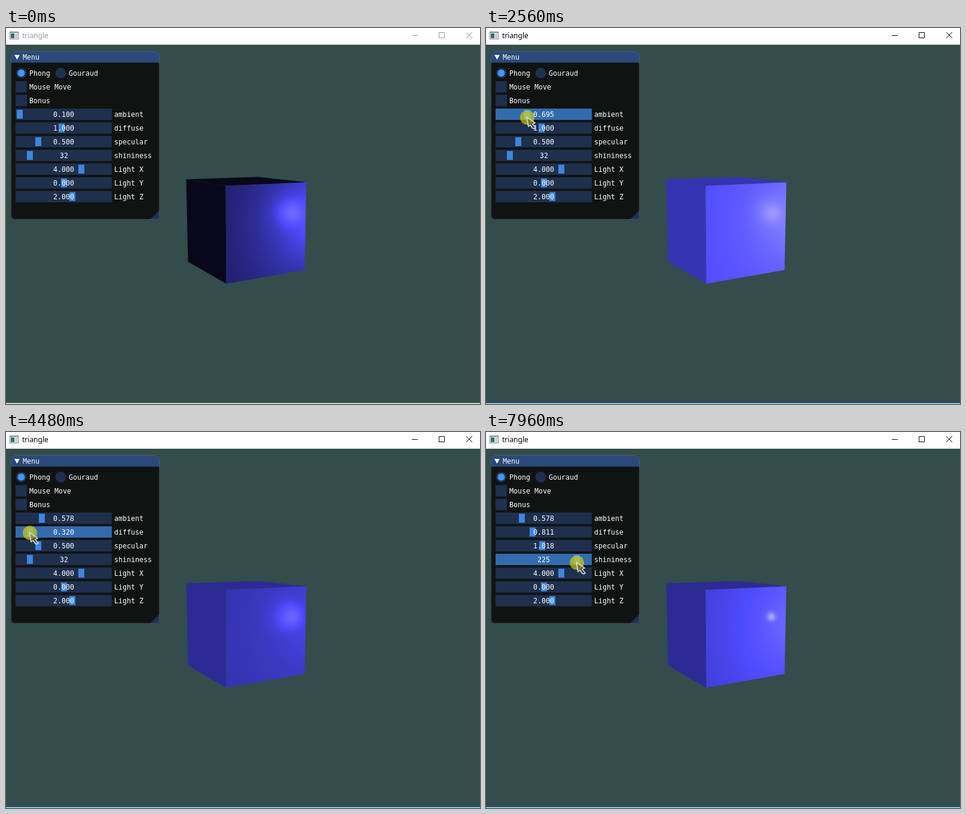
These frames come from a looping animation (793x630 px, 8000 ms). An HTML page with a canvas:

```html
<!DOCTYPE html>
<html lang="en">
<head>
<meta charset="utf-8">
<title>triangle</title>
<style>
html, body { margin: 0; width: 100%; height: 100%; overflow: hidden; background: #334c4c; }
canvas { display: block; }
</style>
</head>
<body>
<canvas id="stage" width="793" height="630"></canvas>
<script>
const ctx = document.getElementById('stage').getContext('2d');
const LOOP = 8000, STEP = 40, ENTER = 160, FOCUS = 1160;
const MONO = '11.63px "DejaVu Sans Mono", monospace';
const SANS = '12px "Noto Sans", sans-serif';
const TRACK_X = 23, TRACK_W = 147;

// drag: turning points [time, x] while the button is held until "to"; dy: grip below the row's middle
const SLIDERS = [
  { name: 'ambient', min: 0.1, max: 2, start: 0.1, to: 2840, dy: 5,
    drag: [[FOCUS, 30], [1840, 95], [2000, 99], [2400, 56], [2560, 69], [2720, 60]] },
  { name: 'diffuse', min: 0.1, max: 2, start: 1, to: 5240, dy: 1,
    drag: [[3120, 75], [3480, 96], [3880, 157], [4480, 40], [4600, 28], [5160, 78]] },
  { name: 'specular', min: 0.1, max: 2, start: 0.5, to: 6880, dy: 4,
    drag: [[5440, 54], [5960, 89], [6120, 112], [6400, 28], [6720, 94]] },
  { name: 'shininess', min: 2, max: 256, start: 32, to: LOOP, dy: 5, whole: true,
    drag: [[7360, 34], [7960, 152]] },
  { name: 'Light X', min: -10, max: 10, start: 4 },
  { name: 'Light Y', min: -10, max: 10, start: 0 },
  { name: 'Light Z', min: -10, max: 10, start: 2 }
];
const rowTop = i => 135 + i * 23;
const clamp = k => Math.max(0, Math.min(1, k));

// The pointer enters, waits, then goes from drag to drag.
const path = [[ENTER, 653, 577], [760, 65, 138], [1000, 65, 138]];
SLIDERS.forEach((s, i) => {
  if (!s.drag) return;
  const y = rowTop(i) + 10 + s.dy;
  const lastX = s.drag[s.drag.length - 1][1];
  [...s.drag, [s.to, lastX]].forEach(([t, x]) => path.push([t, x, y]));
});

function pointerAt(t) {
  let i = 0;
  while (i < path.length - 2 && t >= path[i + 1][0]) i++;
  const [t0, x0, y0] = path[i], [t1, x1, y1] = path[i + 1];
  const k = clamp((t - t0) / (t1 - t0)), ease = k * k * (3 - 2 * k);
  return { x: Math.round(x0 + (x1 - x0) * ease), y: Math.round(y0 + (y1 - y0) * ease) };
}

const isHeld = (s, t) => s.drag && t >= s.drag[0][0] && t < s.to;

function valueAt(s, t) {
  if (!s.drag || t < s.drag[0][0]) return s.start;
  const k = clamp((pointerAt(Math.min(t, s.to)).x - TRACK_X) / TRACK_W);
  const v = s.min + k * (s.max - s.min);
  return s.whole ? Math.round(v) : v;
}

// ---- drawing helpers ----
function rect(x, y, w, h, color) {
  ctx.fillStyle = color;
  ctx.fillRect(x, y, w, h);
}
function disc(x, y, r, color) {
  ctx.fillStyle = color;
  ctx.beginPath();
  ctx.arc(x, y, r, 0, 7);
  ctx.fill();
}
function trace(points) {
  ctx.beginPath();
  points.forEach(([x, y]) => ctx.lineTo(x, y));
  ctx.closePath();
}
function poly(points, color) {
  trace(points);
  ctx.fillStyle = color;
  ctx.fill();
}
function text(str, x, y, color = '#fff', font = MONO) {
  ctx.font = font;
  ctx.fillStyle = color;
  ctx.fillText(str, x, y);
}

// ---- cube ----
const nearTop = [367.5, 264.5], nearBase = [368.5, 428.5];
const rightTop = [502.5, 258.5], rightBase = [499.5, 405.5];
const leftTop = [301.5, 253.5], leftBase = [304.5, 391.5], farTop = [422.5, 249.5];
const TINT = [0.305, 0.295, 1];
const BOX = { x: 366, y: 256, w: 138, h: 174 };

const dot = (a, b) => a[0] * b[0] + a[1] * b[1] + a[2] * b[2];
const sub = (a, b) => a.map((v, i) => v - b[i]);
const unit = a => a.map(v => v / Math.sqrt(dot(a, a)));

const face = document.createElement('canvas');
face.width = BOX.w;
face.height = BOX.h;
const faceCtx = face.getContext('2d');
const pixels = faceCtx.createImageData(BOX.w, BOX.h);
const facing = new Float32Array(BOX.w * BOX.h);
const mirror = new Float32Array(BOX.w * BOX.h);

// Cast a ray through each pixel onto the plane z = 1 and keep its light angles.
(function castRays() {
  const eye = [-5, 1.84, 8.66], light = [1.31, 0.17, 1.9];
  const ahead = unit(eye.map(v => -v));
  const right = [0.866, 0, 0.5], up = [0.0905, 0.983, -0.1567];
  for (let j = 0, n = 0; j < BOX.h; j++) {
    for (let i = 0; i < BOX.w; i++, n++) {
      const sx = (BOX.x + i - 397) / 724, sy = (327.5 - BOX.y - j) / 724;
      const ray = ahead.map((v, k) => v + right[k] * sx + up[k] * sy);
      const d = (1 - eye[2]) / ray[2];
      const p = eye.map((v, k) => v + ray[k] * d);
      const l = unit(sub(light, p)), v = unit(sub(eye, p));
      facing[n] = Math.max(0, l[2]);
      mirror[n] = Math.max(0, dot(v, [-l[0], -l[1], l[2]]));
    }
  }
})();

let shaded = '';
function shadeFace(amb, dif, spec, shine) {
  const key = [amb, dif, spec, shine].join();
  if (key === shaded) return;
  shaded = key;
  const out = pixels.data;
  for (let n = 0; n < facing.length; n++) {
    const sum = 255 * (amb + dif * facing[n] + spec * Math.pow(mirror[n], shine));
    for (let c = 0; c < 3; c++) out[n * 4 + c] = sum * TINT[c];
    out[n * 4 + 3] = 255;
  }
  faceCtx.putImageData(pixels, 0, 0);
}

function drawCube([amb, dif, spec, shine]) {
  const dark = 'rgb(' + TINT.map(c => Math.min(255, Math.round(c * amb * 255))).join() + ')';
  poly([leftTop, nearTop, nearBase, leftBase], dark);
  poly([leftTop, farTop, rightTop, nearTop], dark);
  shadeFace(amb, dif, spec, shine);
  ctx.save();
  trace([nearTop, rightTop, rightBase, nearBase]);
  ctx.clip();
  ctx.drawImage(face, BOX.x, BOX.y);
  ctx.restore();
}

// ---- window and menu ----
function drawWindow(focused) {
  rect(0, 0, 793, 630, '#334c4c');
  rect(0, 0, 793, 28, '#fff');
  rect(0, 628, 793, 1, focused ? '#1883d7' : '#aaa');
  rect(0, 629, 793, 1, '#e8e8e8');
  rect(6, 6, 15, 13, '#7d868c');
  rect(7, 8, 13, 10, '#eef2f4');
  rect(8, 9, 6, 8, '#2f7268');
  rect(15, 9, 4, 8, '#c3ccd2');
  const ink = focused ? '#000' : '#999';
  text('triangle', 27, 17, ink, SANS);
  ctx.strokeStyle = ink;
  ctx.lineWidth = 1;
  ctx.beginPath();
  ctx.moveTo(679, 12.5);
  ctx.lineTo(689, 12.5);
  ctx.rect(724.5, 7.5, 9, 9);
  ctx.moveTo(770, 7);
  ctx.lineTo(780, 17);
  ctx.moveTo(780, 7);
  ctx.lineTo(770, 17);
  ctx.stroke();
}

function drawSlider(s, y, value, active, hover) {
  rect(16, y, 161, 19, active ? '#326cae' : hover ? '#25476f' : '#1e304d');
  const gx = TRACK_X + (value - s.min) / (s.max - s.min) * TRACK_W;
  rect(Math.round(gx) - 5, y + 2, 10, 15, active ? '#4296fa' : '#3d85e0');
  const label = s.whole ? String(value) : value.toFixed(3);
  text(label, Math.round(96.5 - label.length * 3.5), y + 14);
  text(s.name, 181, y + 14);
}

function drawMenu(values, t, pointer) {
  ctx.save();
  ctx.beginPath();
  ctx.roundRect(8, 39, 249, 282, 7);
  ctx.clip();
  rect(8, 39, 249, 282, '#111313');
  rect(8, 39, 249, 19, '#294a7a');
  poly([[257, 305], [257, 321], [241, 321]], '#1d3253');
  ctx.restore();
  ctx.strokeStyle = 'rgba(110,110,128,.5)';
  ctx.lineWidth = 1;
  ctx.beginPath();
  ctx.roundRect(8.5, 39.5, 248, 281, 7);
  ctx.stroke();

  poly([[14, 45], [23, 45], [18.5, 53]], '#fff');
  text('Menu', 28, 53);
  disc(25.5, 75.5, 9, '#1e304d');
  disc(25.5, 75.5, 6, '#4296fa');
  text('Phong', 39, 80);
  disc(91.5, 75.5, 9, '#1e304d');
  text('Gouraud', 105, 80);
  ['Mouse Move', 'Bonus'].forEach((label, i) => {
    rect(16, 89 + i * 23, 19, 19, '#1e304d');
    text(label, 39, 103 + i * 23);
  });

  const held = SLIDERS.find(s => isHeld(s, t));
  SLIDERS.forEach((s, i) => {
    const dy = pointer.y - rowTop(i);
    const hover = !held && t >= FOCUS && dy >= 0 && dy < 19 && pointer.x < 177;
    drawSlider(s, rowTop(i), values[i], s === held, hover);
  });
}

function drawPointer({ x, y }) {
  disc(x, y, 12, 'rgba(212,206,10,.68)');
  ctx.save();
  ctx.translate(x, y);
  trace([[-1, -1], [13, 9], [8.5, 11], [14, 17], [11.5, 19], [8.5, 17.5], [5.5, 12.5], [2, 15]]);
  ctx.fillStyle = 'rgba(60,75,85,.3)';
  ctx.fill();
  ctx.strokeStyle = '#d3d4cc';
  ctx.lineWidth = 1.8;
  ctx.lineJoin = 'round';
  ctx.stroke();
  ctx.restore();
}

function render(now) {
  const t = Math.floor((now % LOOP) / STEP) * STEP;
  const pointer = pointerAt(t);
  const values = SLIDERS.map(s => valueAt(s, t));
  drawWindow(t >= FOCUS);
  drawCube(values);
  drawMenu(values, t, pointer);
  if (t >= ENTER) drawPointer(pointer);
}

const begin = performance.now();
function tick() {
  render(performance.now() - begin);
  requestAnimationFrame(tick);
}
tick();
</script>
</body>
</html>
```
